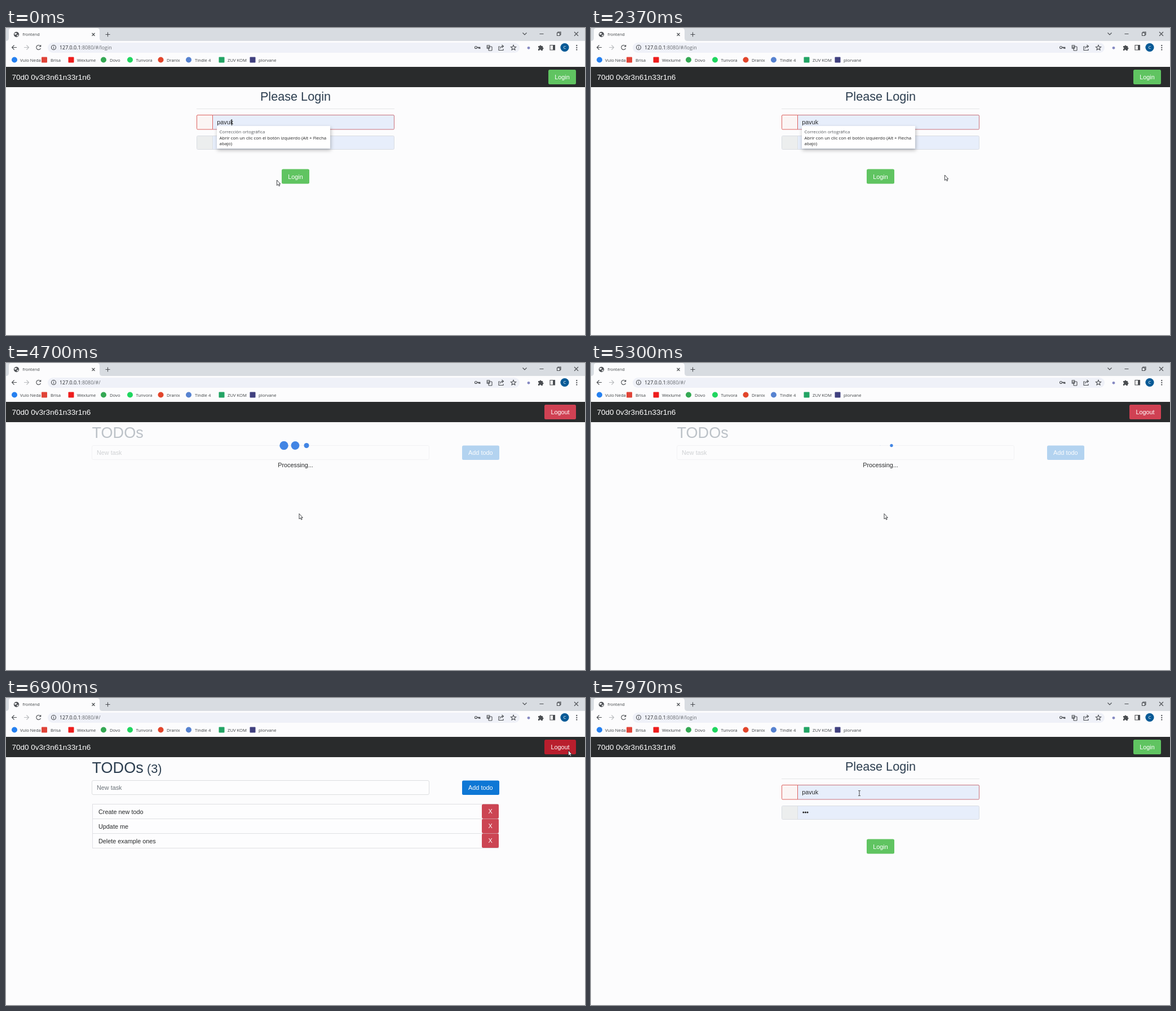
Recreate the animation shown at these times as an HTML page. Size 1027x545 px, loop 8000 ms.

```html
<!DOCTYPE html>
<html lang="en">
<head>
<meta charset="utf-8">
<title>frontend</title>
<style>
html, body { margin: 0; width: 100%; height: 100%; overflow: hidden; background: #fcfcfd; }
svg { display: block; width: 100vw; height: 100vh; }
text { font: 10.83px "Liberation Sans", Arial, sans-serif; fill: #292b2c; white-space: pre; }
.ui text { font: 7.7px "Open Sans", "Noto Sans", sans-serif; fill: #3c4043; }
.mid { text-anchor: middle; }
.white { fill: #fff; }
.line { fill: none; stroke: #4a4d51; stroke-width: 1.1; }
.ink { fill: #4a4d51; }
.head { fill: #2c3e50; }
</style>
</head>
<body>
<svg viewBox="0 0 1027 545" preserveAspectRatio="none">
  <defs>
    <filter id="shade" x="-10%" y="-20%" width="120%" height="160%">
      <feDropShadow dx="1" dy="3" stdDeviation="3" flood-opacity=".28"/>
    </filter>
  </defs>
  <rect width="1027" height="545" fill="#fcfcfd"/>

  <!-- browser window -->
  <g class="ui">
    <rect width="1027" height="23" fill="#d8dce1"/>
    <path d="M0 23Q5 23 5 18V5Q5 0 10 0H161Q166 0 166 5V18Q166 23 171 23Z" fill="#fcfcfd"/>
    <circle cx="18.5" cy="11.5" r="4.7" fill="#505357"/>
    <path d="M15 9.5L18 8.5 19.5 10 17.5 12 15 11.5ZM19 13L22 11.5 21.5 14 19.5 15Z" fill="#eee"/>
    <text x="29.5" y="14" style="font-size:7.4px">frontend</text>
    <path class="line" d="M152.5 9l5 5m0-5l-5 5M176.5 11.500h8m-4-4v8"/>
    <path class="line" d="M916.500 8.500l3.500 3.500 3.500-3.500M946.500 10.500h7M977.500 8.500h5v5h-5zM979 8.500V7h5v5h-1.500M1008 7l7 7m0-7l-7 7" stroke-width=".9"/>

    <rect x="74" y="26" width="837" height="18" rx="9" fill="#eff1f8"/>
    <path class="line" d="M19 34.500H10.500m4-4l-4 4 4 4"/>
    <path class="line" d="M32 34.500h8.500m-4-4l4 4-4 4" style="stroke:#b9bbbe"/>
    <path class="line" d="M61.300 32.500A4 4 0 1 0 61.500 36M61.700 30v3h-3"/>
    <circle class="line" cx="84.500" cy="34.500" r="4" stroke-width=".9"/>
    <path class="line" d="M84.500 34v2.700M84.500 32v1"/>
    <text x="95" y="38" style="font-size:8.9px;fill:#26282b">127.0.0.1<tspan id="path" fill="#6a6e73">:8080/#/login</tspan></text>

    <circle class="line" cx="833.500" cy="34.500" r="2" stroke-width="1.500"/>
    <path class="line" d="M835.500 34.500h5v2.500m-2-2.500v2" style="stroke-width:1.700"/>
    <rect x="852.500" y="30" width="6" height="7" rx="1" fill="#777b80"/>
    <rect class="line" x="856" y="33" width="6" height="7" rx="1"/>
    <path d="M854 32h3m-1.500 0v3" stroke="#fff" stroke-width=".8"/>
    <path class="line" d="M876 33h-2v6.500h8V37M876.500 36.500q.5-4 5-4m-2-2.500l3 2.500-3 2.500" stroke-width=".9"/>
    <path class="line" d="M900 30.300l1.300 3 3.300.3-2.500 2.100.8 3.200-2.900-1.700-2.900 1.700.8-3.200-2.500-2.100 3.300-.3z"/>
    <circle cx="927" cy="35.300" r="2.400" fill="#8589c2"/>
    <path class="ink" d="M944 32h2.500a1.500 1.500 0 0 1 3 0h2.500v2.500a1.500 1.500 0 0 1 0 3V40h-3a1.400 1.400 0 0 0-2.800 0H944v-2.800a1.400 1.400 0 0 0 0-2.800z"/>
    <path class="line" d="M965 30.500h8.500v8.500H965z"/>
    <path class="ink" d="M970 30h4v9h-4z"/>
    <circle cx="991" cy="34.500" r="7.600" fill="#075a96"/>
    <text class="mid" x="991" y="37.300" style="fill:#fff">C</text>
    <path class="ink" d="M1011.300 30h2v2h-2zm0 3.700h2v2h-2zm0 3.700h2v2h-2z"/>
    <g id="marks"></g>
  </g>

  <!-- navigation bar -->
  <rect y="69" width="1027" height="36" fill="#292b2c"/>
  <text class="white" x="10.500" y="91.500" style="font-size:13.53px">70d0 0v3r3n61n33r1n6</text>

  <g id="login">
    <rect x="962" y="74" width="49" height="26" rx="2.500" fill="#60c461"/>
    <text class="mid white" x="986.500" y="91">Login</text>
    <text class="mid head" x="513.500" y="128.500" style="font-size:21.66px">Please Login</text>
    <path d="M338 143.500h351" stroke="#e5e6e8"/>
    <path d="M366.500 154.500H687q1.500 0 1.500 1.500v22.500q0 1.500-1.500 1.500H366.500z" fill="#e7eefb" stroke="#c8727c"/>
    <path d="M366.500 154.500H340q-1.500 0-1.500 1.500v22.500q0 1.500 1.500 1.500h26.500z" fill="#fbf5f4" stroke="#dd625f"/>
    <text x="374.300" y="171">pavuk</text>
    <path id="caret" d="M400.500 162v11" stroke="#111"/>
    <rect x="338.500" y="191.500" width="350" height="24" rx="2" fill="#e7eefb" stroke="#d9dce2"/>
    <path d="M366 192H340q-1 0-1 1v21q0 1 1 1h26z" fill="#eceeee"/>
    <path d="M366.500 192v23" stroke="#dddfe2"/>
    <path d="M376.800 203h.01m3.600 0h.01m3.600 0h.01" stroke="#222" stroke-width="3" stroke-linecap="round"/>
    <g id="tip" class="ui">
      <rect x="374" y="174" width="201" height="40" fill="#fff" filter="url(#shade)"/>
      <text x="378.500" y="187" style="font-size:7.8px;fill:#55585c">Corrección ortográfica</text>
      <g style="font-weight:500">
        <text x="378.500" y="197.700" style="font-size:7.9px;font-weight:500;fill:#222">Abrir con un clic con el botón izquierdo (Alt + Flecha</text>
        <text x="378.500" y="208.300" style="font-size:7.9px;font-weight:500;fill:#222">abajo)</text>
      </g>
    </g>
    <rect x="489" y="250.500" width="49" height="26" rx="2.500" fill="#60c461"/>
    <text class="mid white" x="513.500" y="267.500">Login</text>
  </g>

  <g id="todos">
    <rect id="logout" x="955" y="74" width="56" height="26" rx="2.500"/>
    <text class="mid white" x="983" y="91">Logout</text>
    <g id="form">
      <text class="head" x="152.500" y="132.500" style="font-size:27.07px">TODOs</text>
      <rect x="152.500" y="146.500" width="598" height="25" rx="2.500" fill="#fdfdfe" stroke="#dcdee0"/>
      <text x="161" y="162.500" style="fill:#6b7278">New task</text>
      <rect x="809" y="146.500" width="66" height="25.500" rx="2.500" fill="#0e77d5"/>
      <text class="mid white" x="841.800" y="162.500">Add todo</text>
    </g>
    <g id="list">
      <text class="head" x="250" y="132.500" style="font-size:21.66px">(3)</text>
    </g>
    <g id="wait">
      <circle cx="493" cy="146.500" fill="#4285e4"/>
      <circle cx="513" cy="146.500" fill="#4285e4"/>
      <circle cx="533" cy="146.500" fill="#4285e4"/>
      <text class="mid" x="513.500" y="184.500">Processing...</text>
    </g>
  </g>

  <g id="cursor">
    <path id="arrow" d="M.5 0V9.500L2.700 7.500 4.200 10.700 5.700 10 4.200 7H6.800Z" fill="#fff" stroke="#24262b" stroke-width=".85"/>
    <path id="beam" d="M-2 -4.500H-.6Q0 -4.500 0 -4V4Q0 4.500 -.6 4.500H-2M2 -4.500H.6Q0 -4.500 0 -4M2 4.500H.6Q0 4.500 0 4" fill="none" stroke="#333" stroke-width=".9"/>
  </g>
</svg>
<script>
const $ = id => document.getElementById(id);
const show = (id, on) => $(id).style.display = on ? '' : 'none';

// label, icon x, text x, colour, round icon
const marks = [
  ['Vulo Neda', 15, 25, '#2580f0', 1], ['Brisa', 68, 79, '#e04438', 0],
  ['Wexlume', 115.5, 126, '#ee1c1c', 0], ['Dovo', 173, 184, '#34a853', 1],
  ['Tunvora', 220, 230.5, '#1fd65f', 1], ['Dranix', 274.5, 285, '#e2452b', 1],
  ['Tindle 4', 324, 335, '#5682d0', 1], ['ZUV KOM', 382.5, 393, '#22a464', 0],
  ['plorvane', 437.5, 448, '#40407f', 0]];
$('marks').innerHTML = marks.map(([name, ix, tx, color, round]) =>
  `<rect x="${ix - 5}" y="51.500" width="10" height="10" rx="${round ? 5 : 1}" fill="${color}"/>
   <text x="${tx}" y="59.500">${name}</text>`).join('');

$('list').innerHTML += ['Create new todo', 'Update me', 'Delete example ones'].map((task, i) => {
  const y = 188.5 + i * 26;
  return `<rect x="153.500" y="${y}" width="720" height="26" fill="#fdfdfe" stroke="#dfe0e3"/>
    <text x="164" y="${y + 17}">${task}</text>
    <rect x="844" y="${y}" width="30" height="25.500" rx="2.500" fill="#cc4553"/>
    <text class="mid white" x="859" y="${y + 16.5}">X</text>`;
}).join('');

const LOOP = 8000, TIP_END = 3300, LOG_IN = 4450, LOADED = 5850, LOG_OUT = 7150;
// time, x, y of the pointer
const route = [
  [0, 480, 270], [350, 545, 284], [750, 650, 283], [1300, 690, 260], [1750, 688, 265],
  [2370, 627, 261], [3050, 560, 259], [3770, 528.5, 250], [4150, 519.5, 267.5],
  [6000, 519.5, 267.5], [6700, 990, 91], [6900, 997, 93], [7200, 997, 93],
  [7750, 476, 169], [LOOP, 476, 169]];
const ease = x => x * x * (3 - 2 * x);

function pointer(t) {
  const i = route.findIndex(p => p[0] > t), [t0, x0, y0] = route[i - 1], [t1, x1, y1] = route[i];
  const k = ease((t - t0) / (t1 - t0));
  return [x0 + (x1 - x0) * k, y0 + (y1 - y0) * k];
}

function draw(t) {
  const inside = t >= LOG_IN && t < LOG_OUT, busy = t < LOADED;
  const [x, y] = pointer(t);
  show('login', !inside);
  show('todos', inside);
  show('tip', t < TIP_END);
  show('caret', Math.floor((t + 285) / 530) % 2 === 0);
  show('list', !busy);
  show('wait', busy);
  $('path').textContent = inside ? ':8080/#/' : ':8080/#/login';
  $('form').setAttribute('opacity', busy ? .3 : 1);
  $('logout').setAttribute('fill', x > 955 && y > 74 && y < 100 ? '#b91e2d' : '#d04153');

  // dots swell and shrink one after another
  document.querySelectorAll('#wait circle').forEach((dot, i) => {
    const p = ((t - 4397 + (2 - i) * 160 + 1400) % 1400) / 1400;
    dot.setAttribute('r', 8 * ease(Math.max(0, 1 - Math.abs(p - .4) / .4)));
  });

  const typing = !inside && x > 366 && x < 689 && y > 154 && y < 180;
  show('arrow', !typing);
  show('beam', typing);
  $('cursor').setAttribute('transform', `translate(${x} ${y})`);
}

const start = performance.now();
function tick() {
  draw((performance.now() - start) % LOOP);
  requestAnimationFrame(tick);
}
tick();
</script>
</body>
</html>
```
